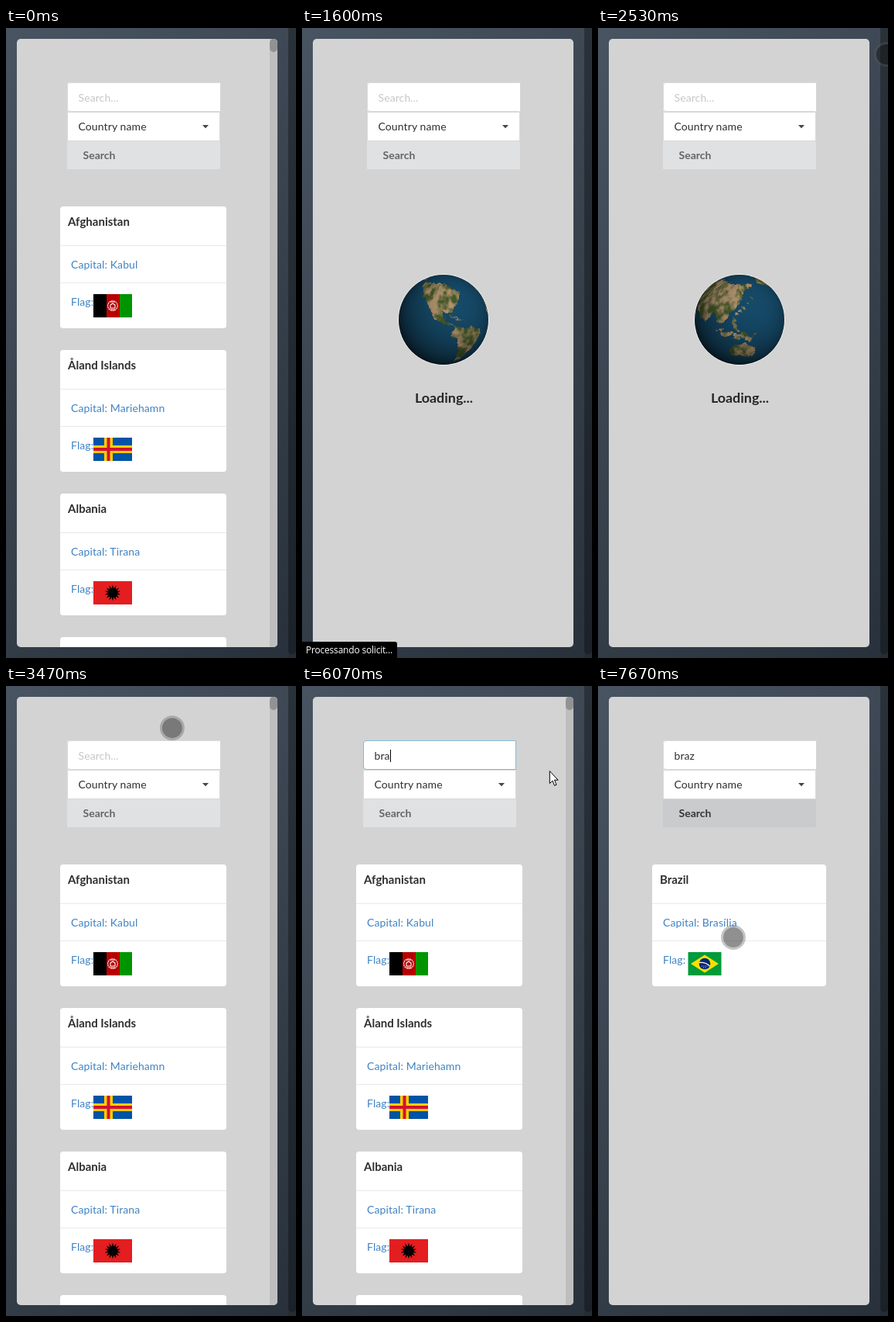
An HTML page with a canvas that plays this animation: 375x812 px, repeating every 8000 ms.

```html
<!DOCTYPE html>
<html lang="en">
<head>
<meta charset="utf-8">
<title>Country search</title>
<style>
  html, body { margin: 0; width: 100%; height: 100%; overflow: hidden; }
  body { position: relative; background: #fff; }
  svg, canvas { position: absolute; display: block; }
  svg { left: 0; top: 0; }
  #page { width: 375px; height: 812px; background: linear-gradient(135deg, #485461, #28313b); }
  #globe { left: 123.5px; top: 316.5px; border: 1.5px solid #f4f4f4; border-radius: 50%; }
  text { font: 14px Lato, sans-serif; letter-spacing: .1px; fill: rgba(0,0,0,.82); white-space: pre; }
  .bold { font-weight: 700; letter-spacing: 0; }
  .title { font-size: 15px; font-weight: 700; letter-spacing: 0; }
  .link { fill: #4183c4; }
  .tip { font: 12px "Open Sans", sans-serif; letter-spacing: -.2px; fill: #fff; }
</style>
</head>
<body>
<div id="page"></div>
<svg id="stage" width="375" height="812"></svg>
<canvas id="globe" width="116" height="116"></canvas>
<script>
const $ = id => document.getElementById(id);
const rect = (x, y, w, h, fill, more = '') =>
  `<rect x="${x}" y="${y}" width="${w}" height="${h}" fill="${fill}" ${more}/>`;
const text = (x, y, s, cls = '', more = '') => `<text x="${x}" y="${y}" class="${cls}" ${more}>${s}</text>`;

// Flags, each in a 50 x 30 box
const spikes = Array.from({ length: 28 }, (_, i) => {
  const a = i * Math.PI / 14, r = i % 2 ? 6 : 10.5;
  return `${25 + r * Math.sin(a)},${15 - r * Math.cos(a)}`;
});
const flags = {
  afghan: rect(0, 0, 17, 30, '#000') + rect(17, 0, 17, 30, '#b80000') + rect(34, 0, 16, 30, '#009400') +
    `<g fill="none" stroke="#fff" stroke-width="1.1"><circle cx="25" cy="15" r="6.3" stroke-dasharray="2 .7"/>
     <path d="M22 18v-4l3-2 3 2v4zM22 10h6M22 20h6"/></g>`,
  aland: rect(0, 0, 50, 30, '#0053a5') + rect(14, 0, 11, 30, '#ffce00') + rect(0, 10, 50, 10, '#ffce00') +
    rect(17.5, 0, 4, 30, '#d21034') + rect(0, 13, 50, 4, '#d21034'),
  albania: rect(0, 0, 50, 30, '#e41e20') + `<polygon points="${spikes.join(' ')}"/>`,
  brazil: rect(3.5, 0, 43, 30, '#009b3a') +
    `<path d="M25 3.5L43 15 25 26.5 7 15z" fill="#fedf00"/><circle cx="25" cy="15" r="7.3" fill="#002776"/>
     <path d="M18 13.5q8-1 13.5 4.5" fill="none" stroke="#fff" stroke-width="1.4"/>
     <path d="M21 18h8M23 20h4" stroke="#fff" stroke-width=".8" stroke-dasharray="1 1.5"/>`
};

const card = (i, w, name, capital, flag) => `<g transform="translate(70 ${230 + 185 * i})">
  ${rect(0, 0, w, 157, '#fff', 'rx="4"')}
  ${rect(0, 50, w, 1, '#e8e9e9')}${rect(0, 98, w, 1, '#e8e9e9')}
  ${text(10, 25, name, 'title')}
  ${capital ? text(14, 80, 'Capital: ' + capital, 'link') + text(14, 128, 'Flag:', 'link') : ''}
  <g transform="translate(43 113)">${flags[flag] || ''}</g></g>`;

const inputEdge = 'M197.5 .5H4Q.5 .5 .5 4V34Q.5 37.5 4 37.5H197.5';

$('stage').innerHTML = `
  <clipPath id="panelClip"><rect x="14" y="14" width="337" height="784" rx="5"/></clipPath>
  ${rect(365, 0, 10, 812, 'rgba(0,0,0,.1)')}${rect(365, -6, 10, 813, 'rgba(0,0,0,.25)', 'rx="5"')}
  <g clip-path="url(#panelClip)">
    ${rect(14, 14, 337, 784, '#d3d3d3')}
    <g id="list">
      ${card(0, 215, 'Afghanistan', 'Kabul', 'afghan')}
      ${card(1, 215, 'Åland Islands', 'Mariehamn', 'aland')}
      ${card(2, 215, 'Albania', 'Tirana', 'albania')}
      ${card(3, 215, '', '', '')}
      ${rect(341, 14, 10, 784, '#bebebe')}${rect(341, 14, 10, 17, '#929292', 'rx="5"')}
    </g>
    <g id="result">${card(0, 225, 'Brazil', 'Brasília', 'brazil')}</g>
  </g>
  <g id="form">
    <path d="M198 0H4Q0 0 0 4V34Q0 38 4 38H198z" fill="#fff"/>
    <path d="${inputEdge}" fill="none" stroke="#d8d8d9"/>
    <path id="focus" d="${inputEdge}z" fill="none" stroke="#85b7d9"/>
    ${rect(.5, 38.5, 197, 37, '#fff', 'stroke="#d8d8d9"')}
    ${rect(0, 76, 198, 36, '#e0e1e2', 'rx="1" id="button"')}
    <g id="labels">
      ${text(14.5, 25, '', '', 'id="query"')}${text(14.5, 62, 'Country name')}
      ${text(20.5, 99, 'Search', 'bold', 'id="search"')}
      <path d="M175 55h8l-4 4.3z" fill="#444"/>
    </g>
    ${rect(0, 12, 1, 16, '#000', 'id="caret"')}
  </g>
  ${text(183.5, 483, 'Loading...', 'bold', 'id="loading" text-anchor="middle" style="font-size:17.9px"')}
  <g id="touch"><circle r="14.5" fill="none" stroke="rgba(90,90,90,.35)" stroke-width="3"/>
    <circle r="13" fill="rgba(20,20,20,.47)"/></g>
  <path id="arrow" d="M.5 .5V16.5L4.2 13L6.7 19.2L9.2 18.2L6.7 12.1H11.3z" fill="#fff" stroke="#000"/>
  ${rect(0, 0, 375, 812, '#fff', 'id="blank"')}
  <g id="tip"><path d="M0 791H120Q123 791 123 794V812H0z"/>${text(5, 806, 'Processando solicit...', 'tip')}</g>`;

// Smooth seeded noise in 0..1, three octaves
const clamp = (v, a = 0, b = 1) => Math.min(b, Math.max(a, v));
const mix = (a, b, u) => a + (b - a) * u;
const ease = u => u * u * (3 - 2 * u);
const hash = (x, y) => { const v = Math.sin(x * 127.1 + y * 311.7) * 43758.5; return v - Math.floor(v); };
function lattice(x, y) {
  const i = Math.floor(x), j = Math.floor(y), u = ease(x - i), v = ease(y - j);
  return mix(mix(hash(i, j), hash(i + 1, j), u), mix(hash(i, j + 1), hash(i + 1, j + 1), u), v);
}
const noise = (x, y) => (4 * lattice(x, y) + 2 * lattice(2 * x, 2 * y) + lattice(4 * x, 4 * y)) / 7;

// Rough continents as lon,lat corners; noise roughens the coasts
const continents = [
  '-165,65 -90,72 -56,52 -81,27 -97,28 -90,16 -79,8 -106,20 -124,42',
  '-78,10 -50,2 -35,-7 -69,-55 -72,-18 -81,-5',
  '-5,45 40,70 180,68 140,54 121,32 105,10 90,22 78,8 50,18 30,36',
  '-17,15 10,37 50,12 20,-35 9,4',
  '114,-24 138,-12 153,-28 145,-38 116,-34'
];
const W = 360, H = 180, N = 116, rad = Math.PI / 180;

function makeMap() {
  const cv = document.createElement('canvas');
  cv.width = W; cv.height = H;
  const g = cv.getContext('2d');
  g.translate(W / 2, H / 2);
  g.scale(1, -1);
  for (const shape of continents) {
    g.beginPath();
    for (const p of shape.split(' ')) g.lineTo(...p.split(','));
    g.fill();
  }
  const island = (lon, lat, size) => { g.beginPath(); g.arc(lon, lat, size, 0, 7); g.fill(); };
  for (let i = 0; i <= 10; i++) {
    const lat = 44 - 5 * i;
    island(122 + 20 * ((lat - 16) / 24) ** 2, lat, 1 + 1.6 * hash(i, 1));  // western Pacific arc
    island(98 + 5 * i, 1 - .7 * i + 3 * Math.sin(i * 2), 1.5 + 2.5 * hash(i, 2));  // equatorial chain
    island(-84 + 2.2 * i, 22 - .9 * i, 1.5 - .1 * i);  // Antilles
  }
  const alpha = g.getImageData(0, 0, W, H).data;
  const green = [70, 90, 42], tan = [180, 150, 112], sea = [22, 75, 106];
  return Array.from({ length: W * H }, (_, p) => {
    const x = p % W, y = p / W | 0;
    const sx = clamp(Math.round(x + 9 * (noise(x / 7, y / 7) - .5)), 0, W - 1);
    const sy = clamp(Math.round(y + 9 * (noise(x / 7 + 90, y / 7) - .5)), 0, H - 1);
    const land = alpha[(sy * W + sx) * 4 + 3] / 255;
    const dry = clamp((noise(x / 9, y / 9) - .5) * 3 + .4 + Math.abs(H / 2 - y) / 300);
    return sea.map((c, k) => mix(c, mix(green[k], tan[k], dry), land));
  });
}
const map = makeMap();
const globe = $('globe').getContext('2d'), image = globe.createImageData(N, N);

function drawGlobe(centre) {
  const c = Math.cos(17 * rad), s = Math.sin(17 * rad);
  for (let p = 0; p < N * N; p++) {
    const x = (p % N + .5) / N * 2 - 1, y = 1 - ((p / N | 0) + .5) / N * 2;
    const z = Math.sqrt(Math.max(0, 1 - x * x - y * y));
    const lat = Math.asin(clamp(y * c + z * s, -1)) / rad;
    const lon = ((centre + Math.atan2(x, z * c - y * s) / rad + 180) % W + W) % W;
    const light = clamp(.43 + .65 * (z * .75 + x * .25 + y * .32), .12, 1.05);
    const colour = map[clamp(90 - lat | 0, 0, H - 1) * W + (lon | 0)];
    image.data.set([...colour.map(v => v * light), 255], p * 4);
  }
  globe.putImageData(image, 0, 0);
}

// Pointer moves: start, end, then the place reached
const moves = [[2330, 2730, 326, 24], [3000, 3470, 215, 54], [3470, 3730, 190, 88], [4530, 4930, 338, 90],
  [5670, 6070, 320, 109], [6070, 6730, 188, 168], [7330, 7670, 175, 324]];
const pointer = t => moves.reduce(([x, y], [from, to, tx, ty]) => {
  const u = clamp((t - from) / (to - from));
  return [mix(x, tx, u), mix(y, ty, u)];
}, [420, 44]);

const keys = [5200, 5730, 5930, 6200];
const show = (id, on) => $(id).style.display = on ? '' : 'none';

function draw(t) {
  const within = (a, b) => t >= a && t < b;
  const list = t < 1070 || within(2730, 6800);
  const spinning = within(1470, 2730) || within(6800, 7270);
  show('list', list);
  show('result', t >= 7270);
  show('globe', spinning);
  show('loading', spinning);
  if (spinning) drawGlobe(-92 - .15 * (t - 1600));

  show('blank', within(1070, 1200));
  show('tip', within(670, 2200));
  $('tip').style.opacity = t < 800 ? .6 : 1;

  $('form').setAttribute('transform', `translate(${list ? 79 : 84} 70)`);
  show('labels', !within(1200, 1470));
  const focused = within(4270, 6730);
  show('focus', focused);
  $('focus').style.opacity = t < 4330 ? .6 : 1;
  const typed = keys.filter(k => t >= k).length, query = $('query');
  query.textContent = typed ? 'braz'.slice(0, typed) : 'Search...';
  query.style.fill = typed ? 'rgba(0,0,0,.82)' : focused ? '#878787' : '#c7c7c7';
  const since = t - (typed ? keys[typed - 1] : 4330);
  show('caret', focused && since >= 0 && since % 1000 < 500);
  $('caret').setAttribute('x', typed ? Math.round(14.5 + query.getComputedTextLength()) : 15);

  const pressed = t >= 6700;
  $('button').setAttribute('fill', pressed ? '#cacbcd' : '#e0e1e2');
  $('search').style.fill = `rgba(0,0,0,${pressed ? .74 : .55})`;

  const [x, y] = pointer(t), arrow = within(4660, 6500);
  show('arrow', arrow);
  show('touch', t >= 2330 && !arrow);
  for (const id of ['arrow', 'touch']) $(id).setAttribute('transform', `translate(${x} ${y})`);
}

const start = performance.now();
function tick() {
  draw((performance.now() - start) % 8000);
  requestAnimationFrame(tick);
}
tick();
</script>
</body>
</html>
```
